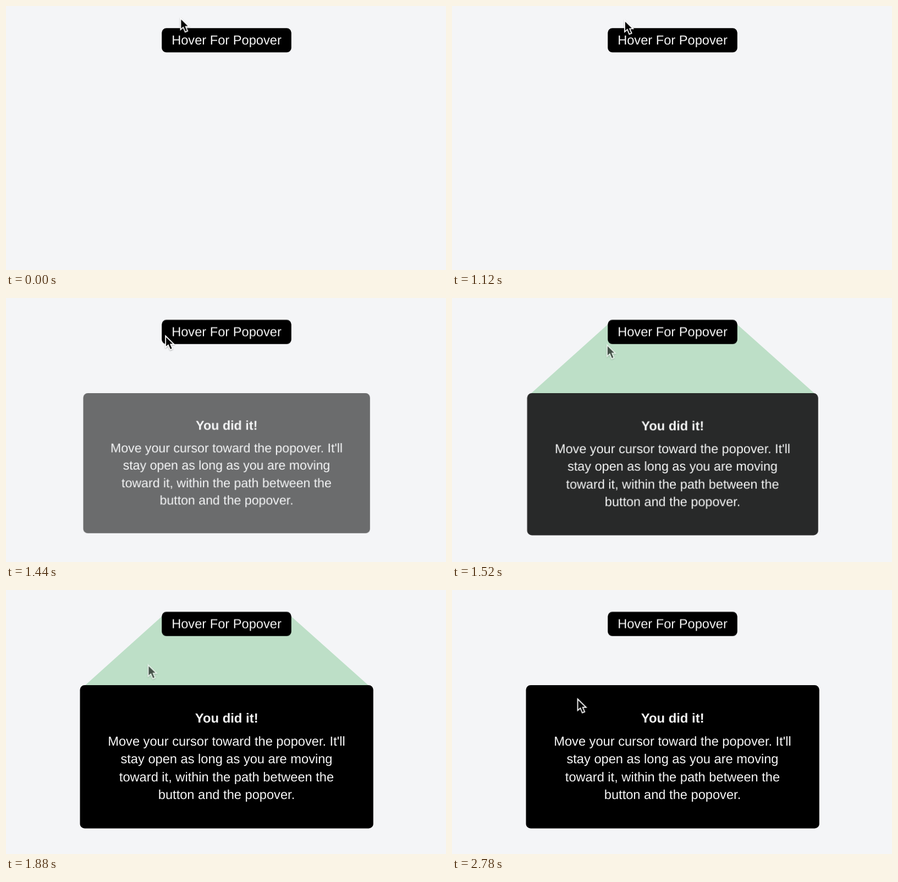
An HTML page for the animation above (2.8 s loop, 800 by 480 pixels).

```html
<!DOCTYPE html>
<html lang="en">
<head>
<meta charset="utf-8">
<title>Hover popover</title>
<style>
  html, body { margin: 0; width: 100%; height: 100%; overflow: hidden; background: #f4f5f7; }
  svg { display: block; width: 800px; height: 480px; }
  text {
    font: 23.65px "Liberation Sans", Arial, Helvetica, sans-serif;
    fill: #f6f6f6;
    text-anchor: middle;
    text-rendering: geometricPrecision;
  }
  .title { font-size: 23.85px; font-weight: 700; }

  .button, .popover, .path, .cursor, .arrow { animation: 2.8s linear infinite; }
  .button { animation-name: lift; }
  .popover { animation-name: open; transform-origin: 401.2px 173px; }
  .path { animation-name: show; fill: #bddfc7; }
  .cursor { animation-name: travel; }
  .arrow { animation-name: dim; filter: drop-shadow(0 1px 1px rgba(0, 0, 0, .3)); }

  @keyframes lift {
    0%, 47.24% { transform: translateY(.6px); }
    47.25%, 100% { transform: none; }
  }
  @keyframes open {
    0% { opacity: 0; transform: scale(.95); }
    47.25% { opacity: 0; transform: scale(.95); animation-timing-function: ease-out; }
    57.96%, 100% { opacity: 1; transform: none; }
  }
  /* safe area: from leaving the button until reaching the popover */
  @keyframes show {
    0%, 53.74% { opacity: 0; }
    53.75%, 78.38% { opacity: 1; }
    78.39%, 100% { opacity: 0; }
  }
  @keyframes dim {
    0%, 53.74% { opacity: 1; }
    53.75%, 78.38% { opacity: .64; }
    78.39%, 100% { opacity: 1; }
  }
  @keyframes travel {
    0% { transform: translate(317.4px, 22.2px); }
    20.71% { transform: translate(317.4px, 22.2px); animation-timing-function: cubic-bezier(.5, 0, .8, .5); }
    40% { transform: translate(313.9px, 26.2px); animation-timing-function: cubic-bezier(.333, .08, .667, .44); }
    51.43% { transform: translate(290.2px, 68.8px); }
    54.29% { transform: translate(282px, 85.2px); animation-timing-function: cubic-bezier(.333, .43, .667, .69); }
    57.14% { transform: translate(277.3px, 96.6px); animation-timing-function: cubic-bezier(.333, .34, .667, .77); }
    78.57% { transform: translate(240.2px, 174.7px); animation-timing-function: cubic-bezier(.333, .7, .667, 1); }
    99.29%, 100% { transform: translate(228.5px, 198.2px); }
  }
</style>
</head>
<body>
<svg viewBox="0 0 800 480">
  <path class="path" d="M292.2 40H509.6L659.2 173.5H143.6Z"/>
  <g class="button">
    <rect x="283.2" y="39.6" width="235.6" height="44.4" rx="8.5"/>
    <text x="401" y="69.3">Hover For Popover</text>
  </g>
  <g class="popover">
    <rect x="134.5" y="173" width="533.3" height="260.6" rx="8.5"/>
    <text class="title" x="401.2" y="241">You did it!</text>
    <text x="401" y="282.5">Move your cursor toward the popover. It'll</text>
    <text x="401" y="315.2">stay open as long as you are moving</text>
    <text x="401" y="347.8">toward it, within the path between the</text>
    <text x="401" y="380.4">button and the popover.</text>
  </g>
  <g class="cursor">
    <path class="arrow" d="M0 0V20.8L4.8 16.5L8.4 25L12.7 23.2L9.2 15.2H15.3Z"
      stroke="#fff" stroke-width="1.8"/>
  </g>
</svg>
</body>
</html>
```
